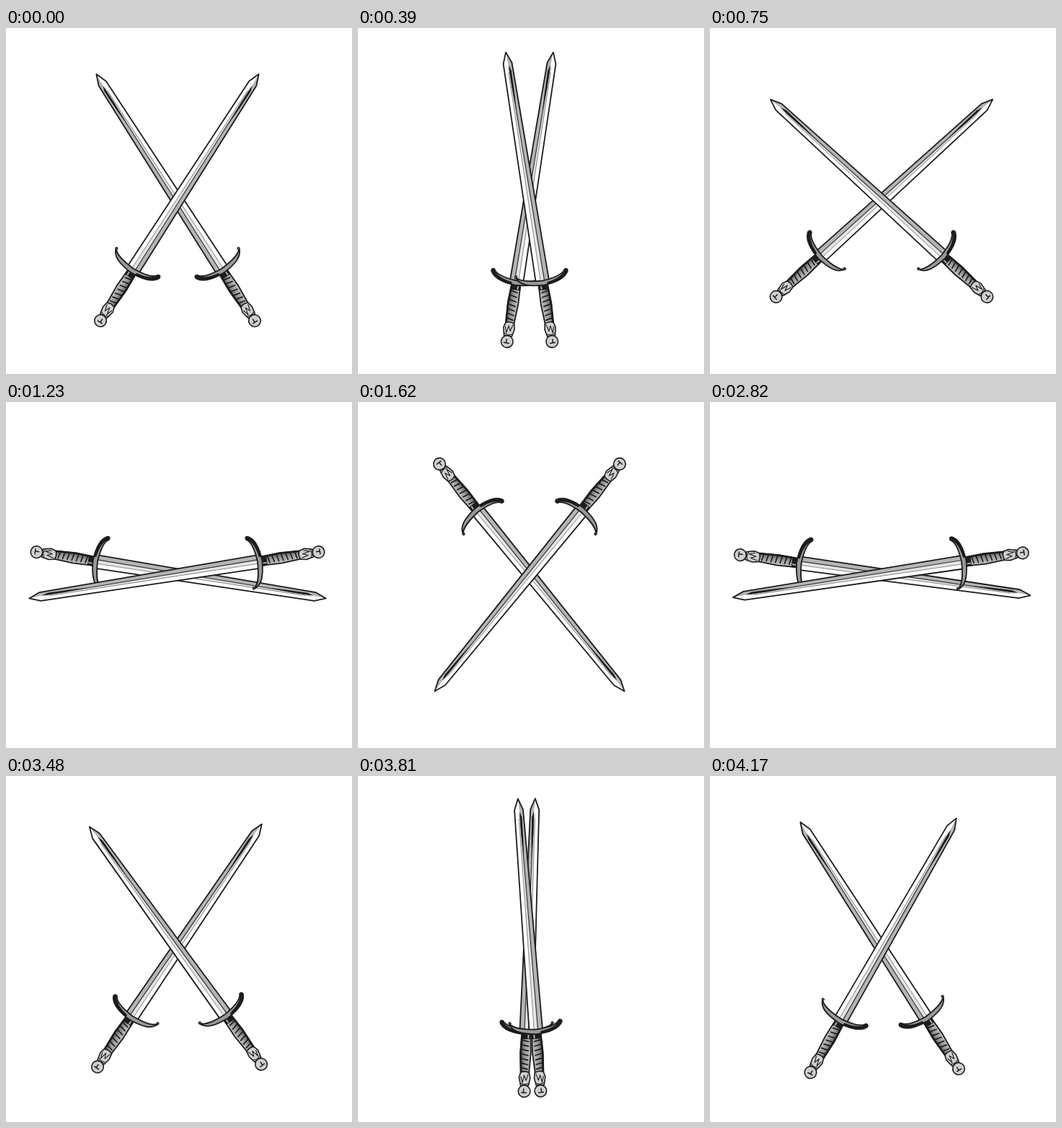
An HTML page for the animation above (4200 ms loop, 480 by 480 pixels).

```html
<!DOCTYPE html>
<html lang="en">
<head>
<meta charset="utf-8">
<title>Crossed swords</title>
<style>
  html, body { margin: 0; width: 100%; height: 100%; overflow: hidden; background: #fff; }
  svg { display: block; width: 100%; height: 100%; }
</style>
</head>
<body>
<svg viewBox="0 0 480 480">
  <defs>
    <linearGradient id="grip-shade">
      <stop offset="0" stop-color="#c4c4c4"/>
      <stop offset=".55" stop-color="#999"/>
      <stop offset="1" stop-color="#555"/>
    </linearGradient>

    <!-- Upright sword, turning point at 0,0 -->
    <g id="sword" stroke="#1c1c1c" stroke-linejoin="round" stroke-linecap="round">
      <g id="blade">
        <path d="M0-208.5 L6-193 L9.3 115 H-9.3 L-6-193Z" fill="#fff" stroke="none"/>
        <path d="M0-206 L6-193 L9.3 115 H2.8 L1-190Z" fill="#b5b5b5" stroke="none"/>
        <path d="M-1.5-188 L-2.6 115 H2.8 L1-188Z" fill="#e4e4e4" stroke="none"/>
        <path d="M-.6-180 L-2.6 115" fill="none" stroke="#777" stroke-width=".8"/>
        <path d="M1.2-185 L2.8 115" fill="none" stroke="#333" stroke-width="1.2"/>
        <path d="M1-191 L3.6-182 L3-150 L1.8-125 L.6-160Z" fill="#1c1c1c" stroke="none"/>
        <path d="M0-208.5 L6-193 L9.3 115 H-9.3 L-6-193Z" fill="none" stroke-width="1.8"/>
      </g>

      <g id="grip">
        <path d="M-6 117 L-7.2 145 L-5.5 174 H5.5 L7.2 145 L6 117Z"
              fill="url(#grip-shade)" stroke-width="1.8"/>
        <path id="wraps" fill="none" stroke-width="1.7"/>
        <path d="M6 120 L7 145 L5.6 172" fill="none" stroke-width="2.8"/>
        <path d="M-6.5 116 H6.5 V125 H-6.5Z" fill="#1c1c1c"/>
        <path d="M-3 119 V124" stroke="#aaa" stroke-width="2"/>
      </g>

      <g id="guard">
        <path d="M-36.5 101 C-33 107 -24 111 0 112.5 C22 111 30 107 33 101.5
                 L37 104 C33 113 22 118 0 119 C-22 117 -33 113 -36.5 101Z"
              fill="#9a9a9a" stroke-width="1.8"/>
        <path d="M8 117 C22 115 30 111 35 103" fill="none" stroke-width="4"/>
        <circle cx="34.7" cy="103" r="2.3" fill="#1c1c1c"/>
        <circle cx="-35.3" cy="101.5" r="1.6" fill="#555"/>
      </g>

      <g id="pommel" fill="#cfcfcf" stroke-width="1.6">
        <path d="M-6 172 Q0 169 6 172 L8 179 L5.5 190 H-5.5 L-7.5 180Z"/>
        <circle cy="198" r="8.3"/>
        <path d="M-4.5 174 L-2 183 L1 176 L3 186 L5.5 178 M-5 187 Q0 190 5 187"
              fill="none" stroke-width="1.1"/>
        <path d="M-3 200 H4 M1 195 V200" fill="none" stroke-width="1.5"/>
      </g>
    </g>
  </defs>

  <rect width="480" height="480" fill="#fff"/>
  <use id="back" href="#sword"/>
  <use id="front" href="#sword"/>
</svg>

<script>
  const LOOP = 4200, STEP = 30;
  const START = -32.7, SWEEP = 180;
  const OPEN_MS = 1680, RETURN_AT = 2310;

  const front = document.getElementById('front');
  const back = document.getElementById('back');

  const wraps = Array.from({ length: 7 }, (_, i) => `M-3.5 ${129 + i * 6.4} L6 ${127 + i * 6.4}`);
  document.getElementById('wraps').setAttribute('d', wraps.join(' '));

  const clamp = x => Math.min(1, Math.max(0, x));

  function angle(t, returnMs) {
    return START + SWEEP * (clamp(t / OPEN_MS) - clamp((t - RETURN_AT) / returnMs));
  }

  function place(sword, mirror, degrees) {
    sword.setAttribute('transform',
      `translate(238 239.5) scale(${mirror} 1) rotate(${-degrees})`);
  }

  function draw(now) {
    const t = Math.floor((now % LOOP) / STEP) * STEP;
    place(front, 1, angle(t, 1890));
    place(back, -1, angle(t, 1860));
  }

  const begin = performance.now();
  function tick() {
    draw(performance.now() - begin);
    requestAnimationFrame(tick);
  }
  tick();
</script>
</body>
</html>
```
